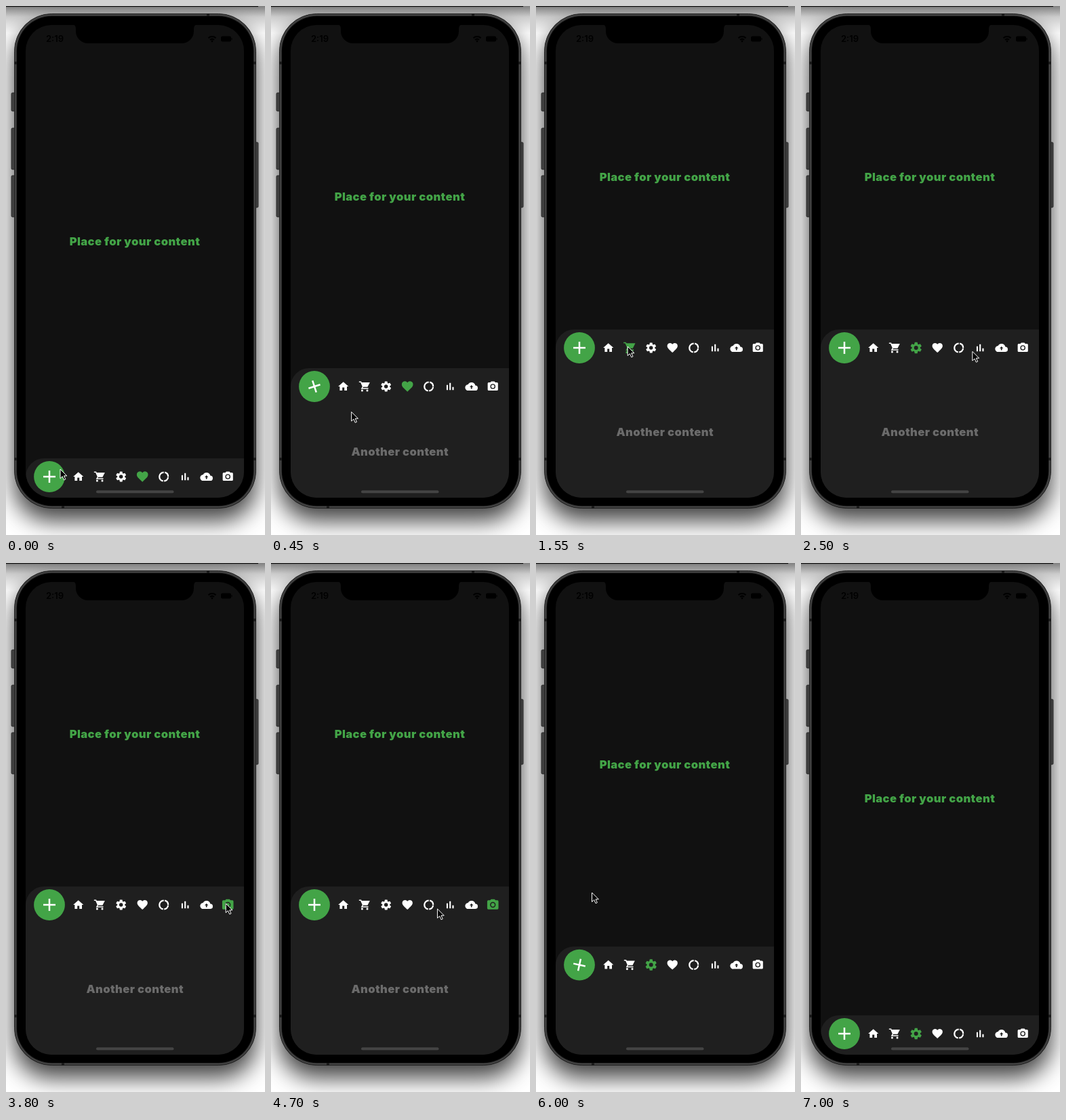
Recreate the animation shown at these times as an HTML page. Size 382x780 px, loop 7.4 s.

```html
<!DOCTYPE html>
<html lang="en">
<head>
<meta charset="utf-8">
<title>Expanding bottom bar</title>
<style>
  html, body { margin: 0; width: 100%; height: 100%; overflow: hidden; background: #fff; }
  svg { display: block; width: 382px; height: 780px; }
  text { font-family: Inter, Roboto, sans-serif; }
  .label { font-size: 16.6px; font-weight: 900; letter-spacing: .4px; text-anchor: middle; }
</style>
</head>
<body>
<svg viewBox="0 0 382 780">
  <defs>
    <filter id="blur" x="-30%" y="-20%" width="160%" height="140%"><feGaussianBlur stdDeviation="17"/></filter>
    <linearGradient id="fade" x2="0" y2="1">
      <stop stop-opacity=".5"/><stop offset=".4" stop-opacity=".2"/><stop offset="1" stop-opacity="0"/>
    </linearGradient>
    <clipPath id="screen"><rect x="29" y="28" width="322" height="697" rx="38"/></clipPath>
    <clipPath id="sheet"><rect id="sheetBox" x="29" width="322" height="300"/></clipPath>
  </defs>

  <rect width="382" height="780" fill="#fff"/>
  <rect x="12" y="29" width="357" height="730" rx="54" opacity=".75" filter="url(#blur)"/>
  <rect width="382" height="40" fill="url(#fade)"/>
  <rect width="372" height="1.2" fill="#111"/>

  <g fill="#414141" stroke="#1d1d1d" stroke-width=".8">
    <rect x="8" y="128" width="6" height="27" rx="1.5"/>
    <rect x="8" y="180" width="6" height="61" rx="1.5"/>
    <rect x="8" y="250" width="6" height="61" rx="1.5"/>
    <rect x="366" y="201" width="6" height="96" rx="1.5"/>
  </g>
  <rect x="12.5" y="11.5" width="356" height="729" rx="55" fill="#303030" stroke="#222"/>
  <rect x="14" y="13" width="353" height="726" rx="53.5" fill="none" stroke="#505050"/>
  <path d="M12 84h4m349 0h4M12 668h4m349 0h4M298 11v4M84 737v4" stroke="#1b1b1b" stroke-width="4"/>
  <rect x="16" y="15" width="349" height="722" rx="51.5"/>

  <g clip-path="url(#screen)">
    <rect x="29" y="28" width="322" height="697" fill="#111"/>
    <text id="title" class="label" x="189.9" fill="#43a447">Place for your content</text>
    <g id="panel">
      <path d="M29 925V694a27 27 0 0 1 27-27H351V925z" fill="#1f1f1f"/>
      <circle cx="64" cy="694" r="22.9" fill="#43a447"/>
      <path id="plus" d="M55 694h18M64 685v18" stroke="#fff" stroke-width="2.5"/>
      <g id="icons"></g>
    </g>
    <g clip-path="url(#sheet)">
      <text id="another" class="label" x="190.2" fill="#6b6b6b">Another content</text>
    </g>
    <rect x="133" y="714.2" width="114.5" height="4" rx="2" fill="#444"/>
  </g>

  <path d="M97 27q6 0 6 7v3a18 18 0 0 0 18 18H259a18 18 0 0 0 18-18v-3q0-7 6-7z"/>
  <text x="59" y="53" font-size="13" font-weight="600">2:19</text>
  <path d="M298.5 47.2a8 8 0 0 1 11 0M301 50a4.5 4.5 0 0 1 6 0" fill="none" stroke="#000" stroke-width="2"/>
  <circle cx="304" cy="52" r="1.4"/>
  <rect x="317" y="44.5" width="15" height="8" rx="2.3"/>
  <path d="M333 47v3" stroke="#000"/>

  <path id="cursor" d="M0 0V13.6l3.2-3 2.3 5.2 2.3-1-2.3-5H9.8z" stroke="#fff" stroke-linejoin="round"/>
</svg>

<script>
const LOOP = 7400, STEP = 50, TRAVEL = 190, SLIDE = 500;
const OPEN_AT = 100, CLOSE_AT = 5767, POINTER_GONE = 6650;
const $ = id => document.getElementById(id);

// Icons on a 24-unit grid
const fill = d => `<path fill="currentColor" fill-rule="evenodd" d="${d}"/>`;
const line = (d, w) => `<path fill="none" stroke="currentColor" stroke-width="${w}" d="${d}"/>`;
const dot = (x, y, r) => `<circle fill="currentColor" cx="${x}" cy="${y}" r="${r}"/>`;
const ring = (r, w, dash = "") =>
  `<circle cx="12" cy="12" r="${r}" fill="none" stroke="currentColor" stroke-width="${w}" stroke-dasharray="${dash}"/>`;
const spin = (n, part) =>
  Array.from({ length: n }, (_, i) => `<g transform="rotate(${360 / n * i} 12 12)">${part}</g>`).join("");

const glyphs = {
  home: fill("M12 3 2 12h3v8h5v-6h4v6h5v-8h3z"),
  cart: fill("M5 4h17l-4.5 9H9z") + line("M1 3h3.6L8.5 12 6.400 16H19", 2) + dot(7, 20, 2) + dot(17, 20, 2),
  gear: ring(5.4, 3.6) + spin(6, fill("M8.8 6 9.7 2h4.6l.9 4z")),
  heart: fill("M12 21.3C4 14 2 12 2 8.5A5.5 5.5 0 0 1 12 5.1 5.5 5.5 0 0 1 22 8.5C22 12 20 14 12 21.3z"),
  donut: ring(8.5, 3, "0 1 11.35 2 24.7 2 11.35 1"),
  bars: line("M6.4 19V9.2M12 19V5M17.6 19v-6", 2.8),
  cloud: fill("M6 20a6 6 0 0 1-.6-12 7.5 7.5 0 0 1 14 2A5 5 0 0 1 19 20zM13.2 13v3.5h-2.4V13H8.5L12 9.500l3.5 3.5z"),
  camera: fill("M4 4h3.2L9 2h6l1.8 2H20q2 0 2 2v12q0 2-2 2H4q-2 0-2-2V6q0-2 2-2zM7 12a5 5 0 0 0 10 0 5 5 0 0 0-10 0z")
    + dot(12, 12, 3.2)
};
const names = Object.keys(glyphs);
const slot = name => 106.7 + 31.5 * names.indexOf(name);

$("icons").innerHTML = names.map(n => `<g>${glyphs[n]}</g>`).join("");
const icons = [...$("icons").children];

// The pointer rests at each stop between two times; a stop on an icon selects it
const rest = (from, to, x, y) => ({ from, to, x, y });
const pick = (from, to, icon) => ({ ...rest(from, to, slot(icon) - 3, 502), icon });
const stops = [
  { ...rest(0, 200, 80, 683), icon: "heart" },
  rest(750, 750, 169.5, 469),
  pick(1450, 1750, "cart"),
  pick(2050, 2200, "gear"),
  pick(2680, 3300, "cloud"),
  pick(3450, 4400, "camera"),
  pick(5000, 5250, "gear"),
  rest(5550, 5700, 84.5, 502),
  rest(6000, 6000, 82.5, 486),
  rest(6600, LOOP, 112, 195)
];

const ramp = (t, start, span) => Math.min(1, Math.max(0, (t - start) / span));
const mix = (a, b, k) => a + (b - a) * k;

function pointerAt(t) {
  const i = stops.findLastIndex(s => s.from <= t);
  const a = stops[i], b = stops[i + 1] || a;
  const u = ramp(t, a.to, b.from - a.to || 1);
  const k = u * u * (3 - 2 * u);
  return [mix(a.x, b.x, k), mix(a.y, b.y, k) + 8 * Math.sin(Math.PI * u)];
}

function draw(t) {
  const open = ramp(t, OPEN_AT, SLIDE) - ramp(t, CLOSE_AT, SLIDE);
  const lift = TRAVEL * open;
  $("panel").setAttribute("transform", `translate(0 ${-lift})`);
  $("plus").setAttribute("transform", `rotate(${360 * open} 64 694)`);
  $("title").setAttribute("y", 353.3 - lift / 2);

  $("another").setAttribute("y", 729 - lift / 2);
  $("another").style.display = t > OPEN_AT && t < CLOSE_AT ? "" : "none";
  $("sheetBox").setAttribute("y", 721 - lift);

  const selected = stops.findLast(s => s.icon && s.from <= t).icon;
  icons.forEach((icon, i) => {
    const on = names[i] === selected;
    icon.style.color = on ? "#43a447" : "#fff";
    icon.setAttribute("transform",
      `translate(${slot(names[i])} 694) scale(${on ? .83 : .76}) translate(-12 -12)`);
  });

  $("cursor").setAttribute("transform", `translate(${pointerAt(t)})`);
  $("cursor").style.display = t < POINTER_GONE ? "" : "none";
}

function tick() {
  const t = performance.now() % LOOP;
  draw(Math.floor(t / STEP) * STEP);
  requestAnimationFrame(tick);
}
tick();
</script>
</body>
</html>
```
